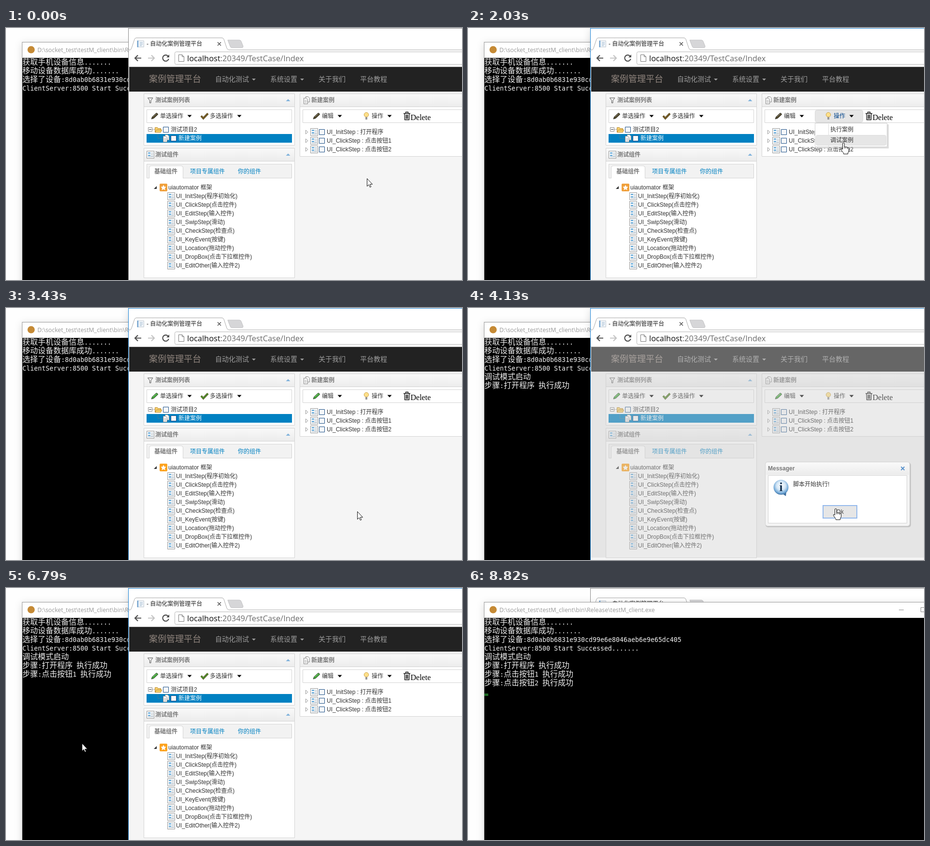
Write an HTML page that moves like this. It is 944 px wide and 523 px high and loops after 9310 ms.

```html
<!DOCTYPE html>
<html lang="zh-CN">
<head>
<meta charset="utf-8">
<title>自动化案例管理平台</title>
<style>
html, body { margin: 0; width: 100%; height: 100%; overflow: hidden; background: #fefefe; }
svg { position: absolute; left: 0; top: 0; width: 944px; height: 523px; overflow: hidden; }
text { font: 12px "Liberation Sans", "Noto Sans CJK SC", "Noto Sans CJK", sans-serif; fill: #333; white-space: pre; }
#web { z-index: 1; }
#term.front { z-index: 2; }
#pointer { z-index: 3; }
.edge { fill: none; stroke: #8a8a8a; }
.active .edge { stroke: #1883d7; }
#term .window, .active .window { filter: drop-shadow(0 3px 8px rgba(0, 0, 0, .14)); }
.url { font: 16.4px "Open Sans", "Noto Sans", sans-serif; fill: #6b6b6b; }
.path { font: 12.3px "Open Sans", "Noto Sans", sans-serif; fill: #999; }
.out text { font-size: 16px; fill: #f0f0f0; }
.out .m { font: 13.29px "DejaVu Sans Mono", monospace; }
.nav text { font-size: 14px; fill: #9d9d9d; }
.nav .brand { font-size: 18px; fill: #8f847d; }
.head { font-weight: bold; fill: #777; }
.link { fill: #0081c2; }
.serif { font: 16px "Liberation Serif", serif; fill: #000; }
.box { fill: #fff; stroke: #d3d3d3; }
.hot text { fill: #00438a; }
.mid { text-anchor: middle; fill: #444; }
.sign { font: bold 25px "Liberation Serif", serif; fill: #12304f; text-anchor: middle; }
.ok rect { fill: #f5f5f5; stroke: #94b9ec; stroke-width: 2; }
.ok.over rect { fill: #e6e6e6; }
#web { --pen: #3fa535; --tick: #4c9f2c; --star: #fca31f; }
#web.dull { --pen: #4b4225; --tick: #7d6127; --star: #f0a03c; }
</style>
</head>
<body>
<svg id="term">
  <path class="window" d="M33 29H964V543H33z" fill="#9a9a9a"/>
  <path d="M34 30H944V62H34z" fill="#fff"/>
  <path d="M34 62H944V523H34z"/>
  <circle cx="52" cy="45" r="7.5" fill="#c58a35"/>
  <text class="path" x="65" y="50">D:\socket_test\testM_client\bin\Release\testM_client.exe</text>
  <path d="M892 45.5h10M944 40.5h-6.500v9h6.500" fill="none" stroke="#888"/>
  <g class="out" id="out"></g>
  <rect data-on="7770-8330 8820-9310" x="34" y="219" width="8" height="5" fill="#1f6a26"/>
</svg>

<svg id="web">
  <defs>
    <linearGradient id="bar" x2="0" y2="1"><stop stop-color="#f9f9f9"/><stop offset="1" stop-color="#ececec"/></linearGradient>
    <radialGradient id="ball" cy=".4" r=".6"><stop stop-color="#fff"/><stop offset=".5" stop-color="#d3e6f6"/><stop offset=".85" stop-color="#6ea6d6"/><stop offset="1" stop-color="#3d6f9f"/></radialGradient>
    <g id="tri"><path d="M-4.500-2.500h9L0 2.500z"/></g>
    <g id="drop"><path d="M-4-2h8L0 2z" fill="#9d9d9d"/></g>
    <g id="fold"><path d="M-4.500 2L0-2.500 4.500 2z" fill="#7fb2dc"/></g>
    <g id="pen"><path d="M-7 6l1.500-4.500L3-6.500q3 0 3.500 3L-2 4.500z" fill="var(--pen)" stroke="#333" stroke-width=".8"/><path d="M-4 1.500L4-5" stroke="#fff" opacity=".45"/></g>
    <g id="tick"><path d="M-7-.500L-2.500 4.500 7-5.500" fill="none" stroke="#54461f" stroke-width="4"/><path d="M-7-.500L-2.500 4.500 7-5.500" fill="none" stroke="var(--tick)" stroke-width="2"/></g>
    <g id="form"><path d="M-7.500-7.500h15v15h-15z" fill="#f8fafb" stroke="#999"/><path d="M-5-3.500h5M-5 1.500h5" stroke="#3f93cf" stroke-width="2"/><path d="M1-3.500h5M1-.500h5M1 2.500h5M-5 4.500H6" stroke="#a9b5c0"/></g>
    <g id="pages" fill="#f3f3f3" stroke="#8d8d8d"><path d="M-1.500-7.500h5l3 3v8h-8z"/><path d="M-5.500-4.500h5l3 3v9h-8z"/><path d="M-3.500.500h4M-3.500 2.500h4M-3.500 4.500h4" stroke="#bbb"/></g>
    <g id="check"><path d="M-5.500-5.500h11v11h-11z" fill="#f6f8fa" stroke="#1c4f86"/></g>
    <g id="bubble"><path d="M1 12L10 18.500 11 9z" fill="#3d6f9f"/><circle r="15.500" fill="url(#ball)"/></g>
  </defs>

  <path class="window" d="M253 0H964V543H253z" fill="#fff"/>
  <path d="M459 25h24q3 0 4 3l4 10q0 3-3 3h-20q-3 0-4-3z" fill="#d6d6d8" stroke="#c2c2c4"/>
  <path d="M254 45.500h3q2-1 3-4l6-18q1-3 4-3h177q3 0 4 3l6 18q1 3 4 4h483" fill="none" stroke="#a9a9a9"/>
  <path d="M271.500 26.500h14v13h-14z" fill="#eef3f8" stroke="#c5ccd4"/>
  <path d="M273 26v14" stroke="#6fa5d6" stroke-width="2"/>
  <path d="M277 30.500h6M277 33.500h6M277 36.500h4" stroke="#9db6cc"/>
  <text x="291" y="37" style="fill:#222">- 自动化案例管理平台</text>
  <path d="M438 29.500l7 7m0-7l-7 7" stroke="#555" stroke-width="1.500"/>
  <g fill="none" stroke="#505050" stroke-width="2.200">
    <path d="M280 62.500h-13m6-6l-6 6 6 6"/>
    <path d="M294 62.500h13m-6-6l6 6-6 6" stroke="#c4c4c4"/>
    <path d="M336 59a6.300 6.300 0 1 0 .800 5"/>
    <path d="M338 55v6h-6z" fill="#505050" stroke="none"/>
  </g>
  <rect x="349.500" y="49.500" width="610" height="26" rx="3" class="box" style="stroke:#b5b5b5"/>
  <path d="M357.500 55.500h7l4 4v10h-11zM364.500 55.500v4h4" fill="#fff" stroke="#777"/>
  <text class="url" x="375" y="69"><tspan fill="#111">localhost</tspan>:20349/TestCase/Index</text>
  <path d="M254 80.500H944" stroke="#bbb"/>

  <path d="M254 81H944V523H254z" fill="#f5f5f5"/>
  <path d="M255 81H944V132H255z" fill="#222"/>
  <g class="nav">
    <text class="brand" x="296" y="112">案例管理平台</text>
    <text x="433" y="111">自动化测试</text><use href="#drop" x="513" y="107"/>
    <text x="547" y="111">系统设置</text><use href="#drop" x="613" y="107"/>
    <text x="647" y="111">关于我们</text>
    <text x="733" y="111">平台教程</text>
  </g>

  <!-- case list -->
  <path class="box" d="M285.500 136.500h312v107h-312z"/>
  <path d="M286 137h311v26H286z" fill="url(#bar)"/><path d="M286 163.500h311" stroke="#d3d3d3"/>
  <path d="M293.500 145h10.500l-4 5.500v5h-2.500v-5z" fill="#eee" stroke="#555"/>
  <text class="head" x="309" y="154">测试案例列表</text><use href="#fold" x="584" y="150"/>
  <path class="box" d="M291.500 169.500h300v27h-300z"/>
  <use href="#pen" x="308" y="183"/><text x="319" y="187">单选操作</text><use href="#tri" x="380" y="183"/>
  <use href="#tick" x="411" y="183"/><text x="422" y="187">多选操作</text><use href="#tri" x="483" y="183"/>
  <path d="M291 220h301v18H291z" fill="#0081c2"/>
  <path d="M303 210.500h5M314.500 220v9.500h10" fill="none" stroke="#777" stroke-dasharray="1 1"/>
  <path d="M294.500 206.500h8v8h-8z" fill="#fff" stroke="#8b8b8b"/><path d="M296 210.500h5" stroke="#333"/>
  <path d="M308.500 216.500v-10h5l1 2h6v3h2l-2 5z" fill="#f6cf6c" stroke="#b98a32"/><path d="M308.500 216.500l3-5h11" fill="none" stroke="#b98a32"/>
  <use href="#check" x="331" y="211"/><text x="341" y="215">测试项目2</text>
  <use href="#pages" x="331" y="229"/><use href="#check" x="347" y="229"/>
  <text x="357" y="233" style="fill:#fff">新建案例</text>

  <!-- components -->
  <path class="box" d="M285.500 249.500h312v269h-312z"/>
  <path d="M286 250h311v26H286z" fill="url(#bar)"/><path d="M286 276.500h311" stroke="#d3d3d3"/>
  <use href="#form" x="299" y="263"/>
  <text class="head" x="309" y="267">测试组件</text><use href="#fold" x="584" y="263"/>
  <path d="M291.500 282.500h300v29h-300z" fill="#f2f2f2" stroke="#d3d3d3"/>
  <path d="M296.500 312v-22q0-4 4-4h62q4 0 4 4v22" fill="#fff" stroke="#d3d3d3"/>
  <text class="head" x="307" y="302">基础组件</text>
  <text class="link" x="381" y="302">项目专属组件</text>
  <text class="link" x="480" y="302">你的组件</text>
  <path d="M312 328v6h-6z" fill="#333"/>
  <rect x="318" y="323" width="16" height="16" rx="2" style="fill:var(--star)"/>
  <path d="M326 325.500l1.700 3.700 4 .500-3 2.700.800 4-3.500-2-3.500 2 .800-4-3-2.700 4-.500z" fill="#fff"/>
  <text x="336" y="335">uiautomator 框架</text>
  <g id="parts"></g>

  <!-- open case -->
  <path class="box" d="M608.500 136.500h400v130h-400z"/>
  <path d="M609 137h335v26H609z" fill="url(#bar)"/><path d="M609 163.500h335" stroke="#d3d3d3"/>
  <use href="#pages" x="622" y="150"/><text class="head" x="632" y="154">新建案例</text>
  <path class="box" d="M614.500 169.500h400v27h-400z"/>
  <use href="#pen" x="643" y="183"/><text x="654" y="187">编辑</text><use href="#tri" x="691" y="183"/>
  <rect data-on="910-2170" x="718.500" y="170.500" width="99" height="25" rx="4" fill="#e6e6e6" stroke="#dadada"/>
  <circle cx="746" cy="180" r="4.700" fill="#ffe08a" stroke="#c9a24a"/><path d="M744 185h4v5h-4z" fill="#999"/>
  <g id="action"><text x="757" y="187">操作</text></g><use href="#tri" x="794" y="183"/>
  <path d="M823 177.500h14M827.500 177v-2.500h5v2.500M825 178l.500 12.500h9l.500-12.500M828 180v8.500M830 180v8.500M832 180v8.500" fill="none" stroke="#111" stroke-width="1.300"/>
  <text class="serif" x="837.500" y="191">Delete</text>
  <g id="steps"></g>

  <g data-on="1330-2170">
    <path d="M721 200h150v50H721z" fill="#bbb" opacity=".5"/>
    <path class="box" d="M718.500 197.500h149v49h-149z"/>
    <path d="M746.500 199v47" stroke="#ddd"/>
    <rect id="pick" x="720.500" width="145" height="21" rx="3" fill="#e6e6e6" stroke="#ddd"/>
    <text x="750" y="215">执行案例</text><text x="750" y="237">调试案例</text>
  </g>

  <path data-on="2170-3430 3500-4410" d="M255 81H944V518H255z" fill="#ccc" opacity=".4"/>
  <g data-on="2170-3430 3500-4410">
    <rect x="616" y="321" width="301" height="134" rx="5" fill="#aaa" opacity=".55"/>
    <rect x="615.500" y="319.500" width="299" height="133" rx="5" fill="#f4f4f4" stroke="#d3d3d3"/>
    <path d="M617 321h296v25H617z" fill="url(#bar)"/>
    <path class="box" d="M621.500 347.500h287v99h-287z"/>
    <path d="M896.500 329.500l7 7m0-7l-7 7" stroke="#5a93cc" stroke-width="2"/>
    <use href="#bubble" x="648" y="372"/>
  </g>
  <g data-on="2170-3430">
    <text class="head" x="621" y="337">Message</text>
    <text class="sign" x="648" y="380">?</text>
    <text x="673" y="370">调试案例会自动保存,是否继续?</text>
    <g class="ok" data-over="2940-3430"><rect x="695" y="410" width="70" height="26"/><text class="mid" x="730" y="427">Ok</text></g>
    <rect x="775.500" y="410.500" width="69" height="25" rx="4" fill="url(#bar)" stroke="#bbb"/><text class="mid" x="810" y="427">Cancel</text>
  </g>
  <g data-on="3500-4410">
    <text class="head" x="621" y="337">Messager</text>
    <text class="sign" x="648" y="380">i</text>
    <text x="673" y="370">脚本开始执行!</text>
    <g class="ok" data-over="3920-4410"><rect x="735" y="410" width="70" height="26"/><text class="mid" x="770" y="427">Ok</text></g>
  </g>
  <path class="edge" d="M253.500 523V.500H944"/>
</svg>

<svg id="pointer">
  <g id="mouse" fill="#fff" stroke="#111" stroke-linejoin="round">
    <path id="arrow" d="M.500.500V16.500L4 13.200 6.500 18.500 8.800 17.500 6.400 12.300H11.500Z"/>
    <path id="hand" transform="translate(-.5 0)" d="M-2 2Q-2 .500-.200.500T1.600 2V8.500Q3 7.500 4.600 9 6.500 8 8 10 10.500 9.500 11 12V17Q10.500 19 9 21V23.500H0V21.500Q-3 18-5 14.500-5.500 12-3.500 12.500L-2 14ZM1.600 8.500V12M4.600 9V12M8 10V13"/>
  </g>
</svg>

<script>
const LOOP = 9310, TICK = 70;
const $ = id => document.getElementById(id);
const text = (x, y, s) => `<text x="${x}" y="${y}">${s}</text>`;
const icon = (id, x, y) => `<use href="#${id}" x="${x}" y="${y}"/>`;

// Console lines with the time each one is printed
const lines = [
  [0, '获取手机设备信息.......'],
  [0, '移动设备数据库成功.......'],
  [0, '选择了设备:8d0ab0b6831e930cd99e6e8046aeb6e9e65dc405'],
  [0, 'ClientServer:8500 Start Successed.......'],
  [3500, '调试模式启动'],
  [3500, '步骤:打开程序 执行成功'],
  [5460, '步骤:点击按钮1 执行成功'],
  [7070, '步骤:点击按钮2 执行成功']
];
$('out').innerHTML = lines.map(([ms, s], i) =>
  `<g data-on="${ms}-${LOOP}">` +
  text(34, 76 + 18 * i, s.replace(/[ -~]+/g, '<tspan class="m">$&</tspan>')) + '</g>').join('');

const parts = ['InitStep(程序初始化)', 'ClickStep(点击控件)', 'EditStep(输入控件)',
  'SwipStep(滑动)', 'CheckStep(检查点)', 'KeyEvent(按键)', 'Location(拖动控件)',
  'DropBox(点击下拉框控件)', 'EditOther(输入控件2)'];
$('parts').innerHTML = parts.map((s, i) =>
  icon('form', 342, 349 + 18 * i) + text(352, 353 + 18 * i, 'UI_' + s)).join('');

const steps = ['InitStep : 打开程序', 'ClickStep : 点击按钮1', 'ClickStep : 点击按钮2'];
$('steps').innerHTML = steps.map((s, i) => {
  const y = 216 + 18 * i;
  return `<path d="M620.5 ${y - 4}v8l4.500-4z" fill="#fff" stroke="#999"/>` +
    icon('form', 638, y) + icon('check', 654, y) + text(664, y + 4, 'UI_' + s);
}).join('');

// Pointer moves: start time, number of ticks, destination
const moves = [
  [420, 9, 782, 184], [1610, 5, 779, 237], [2030, 1, 778, 238], [2170, 1, 778, 239],
  [2450, 9, 727, 421], [3430, 1, 727, 422], [3710, 1, 728, 422], [3850, 5, 762, 416],
  [4410, 1, 762, 417], [4970, 4, 757, 407], [5320, 3, 753, 401], [6230, 9, 157, 322],
  [7420, 3, 244, 321], [7770, 9, 427, 447]
];
function pointerAt(t) {
  let x = 747, y = 312;
  for (const [start, n, toX, toY] of moves) {
    if (t < start) break;
    const p = Math.min(1, (Math.floor((t - start) / TICK) + 1) / n);
    const e = p * p * (3 - 2 * p);
    x += (toX - x) * e;
    y += (toY - y) * e;
  }
  return [Math.round(x), Math.round(y)];
}

const spans = s => s.split(' ').map(r => r.split('-').map(Number));
const within = (list, t) => list.some(([a, b]) => t >= a && t < b);
const timed = key => [...document.querySelectorAll(`[data-${key}]`)].map(el => [el, spans(el.dataset[key])]);
const shown = timed('on'), hovered = timed('over');
const handTimes = spans('910-2170 2940-3430 3920-4410');
const show = (el, on) => { el.style.display = on ? '' : 'none'; };

function draw() {
  const t = performance.now() % LOOP;
  const [x, y] = pointerAt(t);
  const hand = within(handTimes, t);
  for (const [el, list] of shown) show(el, within(list, t));
  for (const [el, list] of hovered) el.classList.toggle('over', within(list, t));
  $('web').classList.toggle('active', t >= 1120 && t < 6860);
  $('web').classList.toggle('dull', t < 2170);
  $('term').classList.toggle('front', t >= 6860);
  $('action').classList.toggle('hot', t >= 910 && t < 2170);
  show($('pick'), y >= 198);
  $('pick').setAttribute('y', y < 222 ? 200.5 : 222.5);
  show($('mouse'), t < 8750);
  show($('hand'), hand);
  show($('arrow'), !hand);
  $('mouse').setAttribute('transform', `translate(${x} ${y})`);
  requestAnimationFrame(draw);
}
draw();
</script>
</body>
</html>
```
